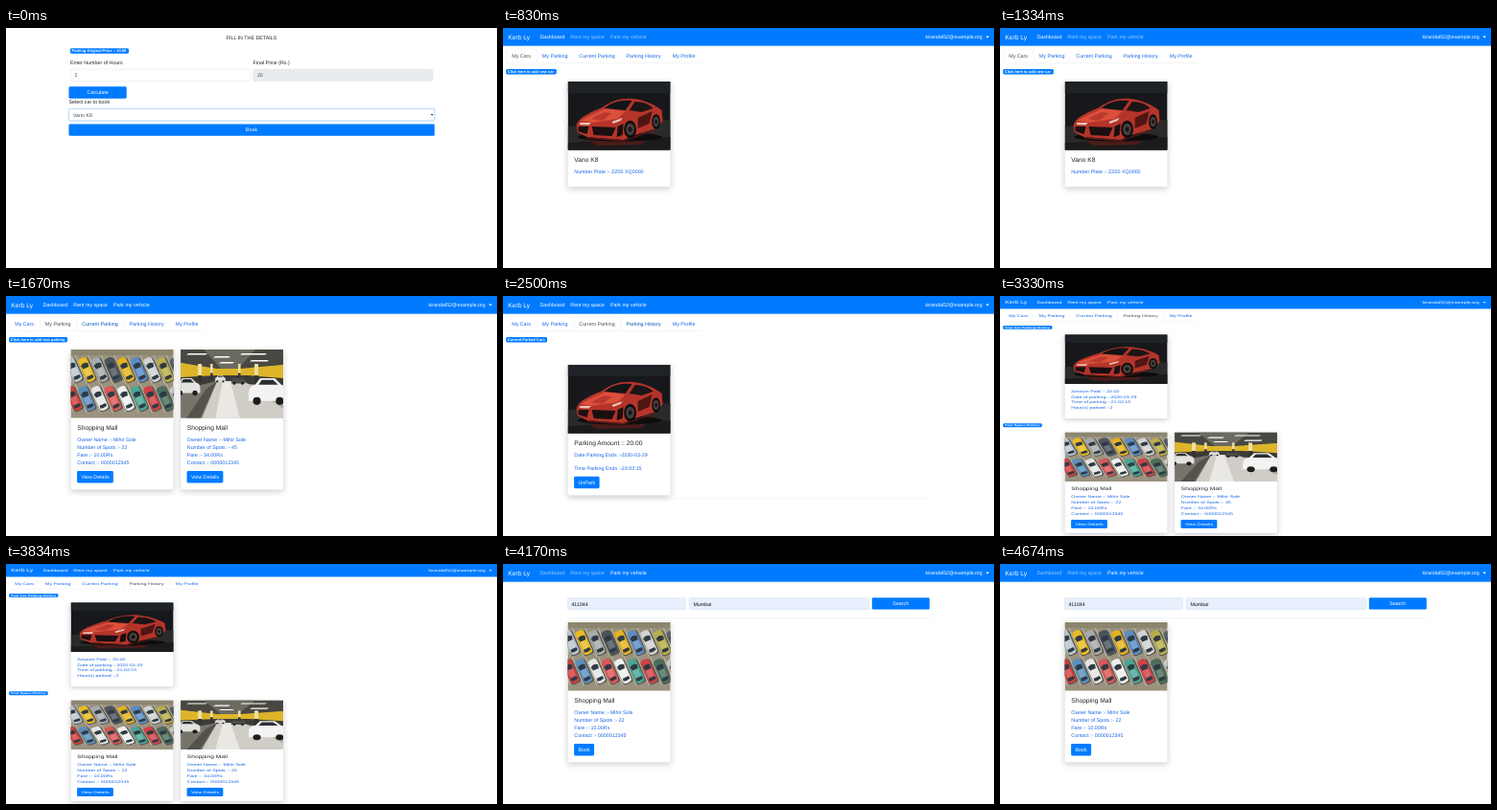
Write an HTML page that moves like this. It is 512 px wide and 251 px high and loops after 5.01 s.

```html
<!DOCTYPE html>
<html lang="en">
<head>
<meta charset="utf-8">
<title>Parking app tour</title>
<style>
html, body { margin: 0; width: 100%; height: 100%; overflow: hidden; background: #fff; }
#stage { position: relative; width: 512px; height: 251px; overflow: hidden; }
#strip { animation: tour 5010ms step-end infinite; }
#strip > svg { display: block; overflow: hidden; }
text { font-family: "Liberation Sans", Arial, sans-serif; text-rendering: geometricPrecision; white-space: pre; }
.shadow { filter: drop-shadow(0 2.67px 3px rgba(0, 0, 0, .2)); }
@keyframes tour {
  0% { transform: translateY(0); }
  16.567% { transform: translateY(-251px); }
  33.333% { transform: translateY(-502px); }
  49.9% { transform: translateY(-753px); }
  66.467% { transform: translateY(-1004px); }
  83.234% { transform: translateY(-1255px); }
}
</style>
</head>
<body>
<div id="stage"><div id="strip"></div></div>
<script>
const BLUE = '#007bff', LINK = '#1a66e6', INK = '#212529', GREY = '#495057';
const APP = 'Kerb Ly', MAIL = 'kirandal52@example.org', CAR = 'Vano K8';
const OWNER = 'Mihir Sole', PHONE = '0000012345', PLATE = 'ZZ00 XQ0000';

const text = (x, y, str, { fill = INK, size = 5.333, anchor = 'start', weight = 400 } = {}) =>
  `<text x="${x}" y="${y}" fill="${fill}" font-size="${size}" text-anchor="${anchor}" font-weight="${weight}">${str}</text>`;
const box = (x, y, w, h, fill, extra = '') =>
  `<rect x="${x}" y="${y}" width="${w}" height="${h}" fill="${fill}" ${extra}/>`;
const path = (d, fill, extra = '') => `<path d="${d}" fill="${fill}" ${extra}/>`;
const ellipse = (x, y, rx, ry, fill) => `<ellipse cx="${x}" cy="${y}" rx="${rx}" ry="${ry}" fill="${fill}"/>`;
const rule = (x1, x2, y, color = '#e3e3e3') => box(x1, y, x2 - x1, .34, color);

const button = (x, y, w, label) =>
  box(x, y, w, 12.4, BLUE, 'rx="1.33"') +
  text(x + w / 2, y + 8, label, { fill: '#fff', anchor: 'middle' });
const badge = (x, y, w, label) =>
  box(x, y, w, 5.5, BLUE, 'rx="1.33"') +
  text(x + 1.6, y + 4.2, label, { fill: '#fff', size: 4, weight: 700 });
const field = (x, y, w, value, { fill = '#fff', stroke = '#ced4da', ink = GREY } = {}) =>
  box(x + .17, y + .17, w - .34, 12.33, fill, `rx="1.33" stroke="${stroke}" stroke-width=".34"`) +
  text(x + 4.4, y + 8.2, value, { fill: ink });

// Navigation bar; active is -1 when every link is lit
function navbar(active) {
  const links = [[38.4, 'Dashboard'], [70.3, 'Rent my space'], [112, 'Park my vehicle']];
  return box(0, 0, 512, 18.67, BLUE) +
    text(5.33, 11.7, APP, { fill: '#fff', size: 6.667 }) +
    links.map(([x, s], i) => text(x, 11.2, s, {
      fill: active < 0 || i === active ? '#fff' : 'rgba(255,255,255,.6)'
    })).join('') +
    text(440.5, 11.2, MAIL, { fill: '#fff' }) +
    path('M503.4 8.6h3.6l-1.8 1.9z', '#fff');
}

const TABS = [[3.7, 'My Cars'], [35.3, 'My Parking'], [73.8, 'Current Parking'],
  [123, 'Parking History'], [171.2, 'My Profile'], [206]];
function tabs(active, hover) {
  return rule(3.7, 206, 36, '#dee2e6') + TABS.slice(0, 5).map(([x, s], i) => {
    const end = TABS[i + 1][0], on = i === active, over = i === hover;
    const frame = `M${x + .17} 36.3V23.3q0-1.3 1.3-1.3H${end - 1.47}q1.3 0 1.3 1.3V36.3`;
    return (on || over ? path(frame, '#fff', `stroke="${on ? '#dee2e6' : '#e9ecef'}" stroke-width=".34"`) : '') +
      text(x + 5.5, 30.7, s, { fill: on ? GREY : over ? '#0056b3' : LINK });
  }).join('');
}

const photo = (name, x, y) => `<use href="#${name}" x="${x}" y="${y}" width="107" height="71.5"/>`;
const lines = (x, y, step, list) => list.map((s, i) => text(x, y + i * step, s, { fill: LINK })).join('');
const frame = (x, y, h) =>
  box(x, y, 107.2, h, '#fff', 'rx="1.33" class="shadow"') +
  box(x + .17, y + .17, 106.9, h - .34, 'none', 'rx="1.33" stroke="#dfdfdf" stroke-width=".34"');

function card(x, y, h, pic, title, rows, { first = 95.6, step = 8 } = {}) {
  return frame(x, y, h) + photo(pic, x + .1, y) +
    (title ? text(x + 6.8, y + 84.2, title, { size: 6.667 }) : '') +
    lines(x + 6.8, y + first, step, rows);
}
function mall(x, y, pic, spots, fare, label, w) {
  return card(x, y, 146.5, pic, 'Shopping Mall', [
    `Owner Name :- ${OWNER}`, `Number of Spots :- ${spots}`, `Fare :- ${fare}Rs`, `Contact :- ${PHONE}`
  ]) + button(x + 6.6, y + 127, w, label);
}
const malls = y =>
  mall(67.5, y, 'lot', 22, '10.00', 'View Details', 37.8) +
  mall(182, y, 'garage', 45, '34.00', 'View Details', 37.8);

// Photo stand-ins, each 107 x 71.5
function sportsCar() {
  const wheel = (x, y, rx, ry) => ellipse(x, y, rx, ry, '#0d0d0e') +
    ellipse(x, y, rx * .68, ry * .68, '#45403f') + ellipse(x, y, rx * .3, ry * .3, '#151414');
  return box(0, 0, 107, 72, '#17181b') + box(0, 0, 107, 12, '#1f2226') +
    path('M0 47L107 40V72H0z', '#2b2a2b') + path('M0 64L107 58V72H0z', '#1c1b1c') +
    path('M18 59L58 63L92 53L76 66L30 67Z', '#4a1c19') + ellipse(54, 58, 44, 4.5, '#0e0d0e') +
    path('M9 45C12 37 24 32 36 27C46 20 56 17 68 18C80 19 92 25 98 30L99 41L92 49L70 56L58 61L20 58L10 53Z', '#b5342a') +
    path('M13 41C21 36 31 32 40 28L60 31L52 39L25 43Z', '#db4f3b') +
    path('M24 39L38 32L46 33L36 41Z', '#b93a2d') +
    path('M38 28C46 21 56 19 67 20L60 30Z', '#121417') +
    path('M64 30L70 21C79 21 85 24 89 28L77 32Z', '#1c1517') +
    path('M73 38L88 31L85 44L73 49Z', '#4f1613') +
    path('M11 47L22 47L20 55L11 52ZM25 47L50 48L46 57L27 56ZM52 47L58 44L57 56L51 58Z', '#1a0f10') +
    path('M13 43L24 43L22 45.5L12 45ZM46 42L57 38L55 41L47 44Z', '#e8c8ba') +
    path('M20 58L58 61L92 50V51L58 62.5L20 59.5Z', '#5e1a16') +
    wheel(65, 50, 6.4, 9.2) + wheel(92, 42, 4.4, 7.8);
}

function lot() {
  const rows = [
    [3, 21, ['#b9c7cf', '#e8bc24', '#a7aaab', '#4a545d', '#e3b31f', '#5a8cc4', '#cfd2d1', '#b9ae4a', '#54606a']],
    [3, 51, ['#cf3f3d', '#5b8fba', '#e3e5e4', '#dc5757', '#eef0ee', '#4aa595', '#cf4248', '#4c6e5c', '#c9ccca']]
  ];
  const car = (x, y, c) => `<g transform="translate(${x} ${y}) rotate(-24)">` +
    box(-5, -12, 11.2, 26.4, '#5b574c', 'rx="3.5"') + box(-4.9, -13.2, 9.8, 26.4, c, 'rx="3.5"') +
    path('M-4-6Q0-9 4-6L3.1-2H-3.1ZM-3.2 7H3.2L3.8 10Q0 11.5-3.8 10Z', '#2f3a44') +
    box(-3.1, -1.6, 6.2, 8.2, '#fff', 'opacity=".18"') + '</g>';
  return box(0, 0, 107, 72, '#9a927f') + box(0, 0, 107, 6, '#8c866f') +
    rows.map(([x0, y, colors]) => colors.map((c, i) =>
      path(`M${x0 + i * 13.6 - 12} ${y - 15}l12 30`, 'none', 'stroke="#cbc5b5" stroke-width=".7"') +
      car(x0 + i * 13.6, y, c)).join('')).join('');
}

function garage() {
  const lamp = (x, y, w) => path(`M${x} ${y}h${w}l-2 1.6h${-w}z`, '#fff');
  const parked = (x, y, s, c) => `<g transform="translate(${x} ${y}) scale(${s})">` +
    path('M0 8Q1 4 4 4L7 0H16L20 4Q24 5 24 9V14H0Z', c) + path('M6 4L8 1H15L18 4Z', '#2b2f33') +
    ellipse(5, 14, 2.4, 2.4, '#1d1d1d') + ellipse(19, 14, 2.4, 2.4, '#1d1d1d') + '</g>';
  return box(0, 0, 107, 72, '#a9a79e') +
    path('M0 0H107V16L62 21H38L0 14Z', '#484741') + path('M24 0H78L60 20H42Z', '#6b6a61') +
    lamp(8, 4, 20) + lamp(36, 7, 16) + lamp(64, 4, 26) + lamp(42, 13, 14) + lamp(74, 11, 18) +
    path('M0 14L38 20H62L107 16V34H0Z', '#dcb52a') +
    path('M0 29L38 27H70L107 30V40L62 35H38L0 42Z', '#3d3b37') +
    path('M36 33H66L107 62V72H0V60Z', '#cfcdc5') + path('M44 33H52L62 72H36Z', '#e9e8e2') +
    path('M0 42L38 33L22 72H0Z', '#77746c') + path('M26 42L38 33L20 72H6Z', '#54524c') +
    [[18, 4, 20], [31, 2.5, 16], [60, 2.5, 16], [77, 4, 20]].map(([x, w, h]) =>
      box(x, 15, w, h * .6, '#efdfa0') + box(x, 15 + h * .6, w, h * .4, '#34342f')).join('') +
    parked(-6, 30, 1.1, '#e3e2de') + parked(36, 27, .45, '#dcdcd9') + parked(53, 27, .6, '#4a4b4b') +
    parked(71, 30, 1.7, '#f3f3f1');
}

const symbol = (id, art) => `<symbol id="${id}" viewBox="0 0 107 71.5" preserveAspectRatio="none">${art}</symbol>`;
const defs = `<defs>${symbol('sports', sportsCar())}${symbol('lot', lot())}${symbol('garage', garage())}</defs>`;

const booking =
  text(256, 12.4, 'FILL IN THE DETAILS', { anchor: 'middle' }) +
  badge(67, 21.2, 61, 'Parking Original Price :: 10.00') +
  text(67, 37.8, 'Enter Number of Hours') + text(257.6, 37.8, 'Final Price (Rs.)') +
  field(67, 43, 187.6, '2') + field(257.5, 43, 187.6, '20', { fill: '#e9ecef' }) +
  button(65.5, 61.3, 60.2, 'Calculate') +
  text(65.5, 79.4, 'Select car to book') +
  box(65, 83.8, 382.4, 13.7, '#bfdeff', 'rx="1.8"') +
  field(65.5, 84.3, 381.4, CAR, { stroke: '#80bdff' }) +
  path('M442.9 89.9h2.6l-1.3 1.9z', INK) +
  button(65.5, 100.4, 381.4, 'Book');

const cars = navbar(0) + tabs(0) + badge(3.2, 42.9, 52.6, 'Click here to add new car') +
  card(67.5, 56, 110.3, 'sports', CAR, [`Number Plate :- ${PLATE}`]);

const spaces = navbar(-1) + tabs(1, 2) + badge(3.2, 42.9, 60.8, 'Click here to add new parking') + malls(56);

const current = navbar(-1) + tabs(2, 3) + badge(3.2, 42.9, 42.8, 'Current Parked Cars') +
  rule(65, 447, 211.8) +
  card(67.5, 72, 136.4, 'sports', 'Parking Amount :: 20.00',
    ['Date Parking Ends :-2020-03-29', 'Time Parking Ends :-23:02:15'], { first: 96.2, step: 13.3 }) +
  button(74.1, 188.8, 26.5, 'UnPark');

// A taller page squeezed into the same height
const history = '<g transform="scale(1 .72)">' + navbar(-1) + tabs(3) +
  badge(3.2, 42.9, 51.2, 'Your Car Parking History') +
  card(67.5, 56, 122, 'sports', '',
    ['Amount Paid :- 20.00', 'Date of parking :-2020-03-29', 'Time of parking :-21:02:15', 'Hour(s) parked :-2'],
    { first: 84.1 }) +
  badge(3.2, 185, 40.5, 'Your Space History') + malls(198) + '</g>';

const filled = { fill: '#e8f0fe', ink: '#111' };
const search = navbar(2) +
  field(67, 35.3, 123.8, '411044', filled) + field(194, 35.3, 187.8, 'Mumbai', filled) +
  button(384.8, 35.2, 60, 'Search') + rule(65, 447, 56.4) +
  mall(67.5, 61, 'lot', 22, '10.00', 'Book', 21);

document.getElementById('strip').innerHTML = [defs + booking, cars, spaces, current, history, search]
  .map(s => `<svg width="512" height="251" viewBox="0 0 512 251">${s}</svg>`).join('');
</script>
</body>
</html>
```
